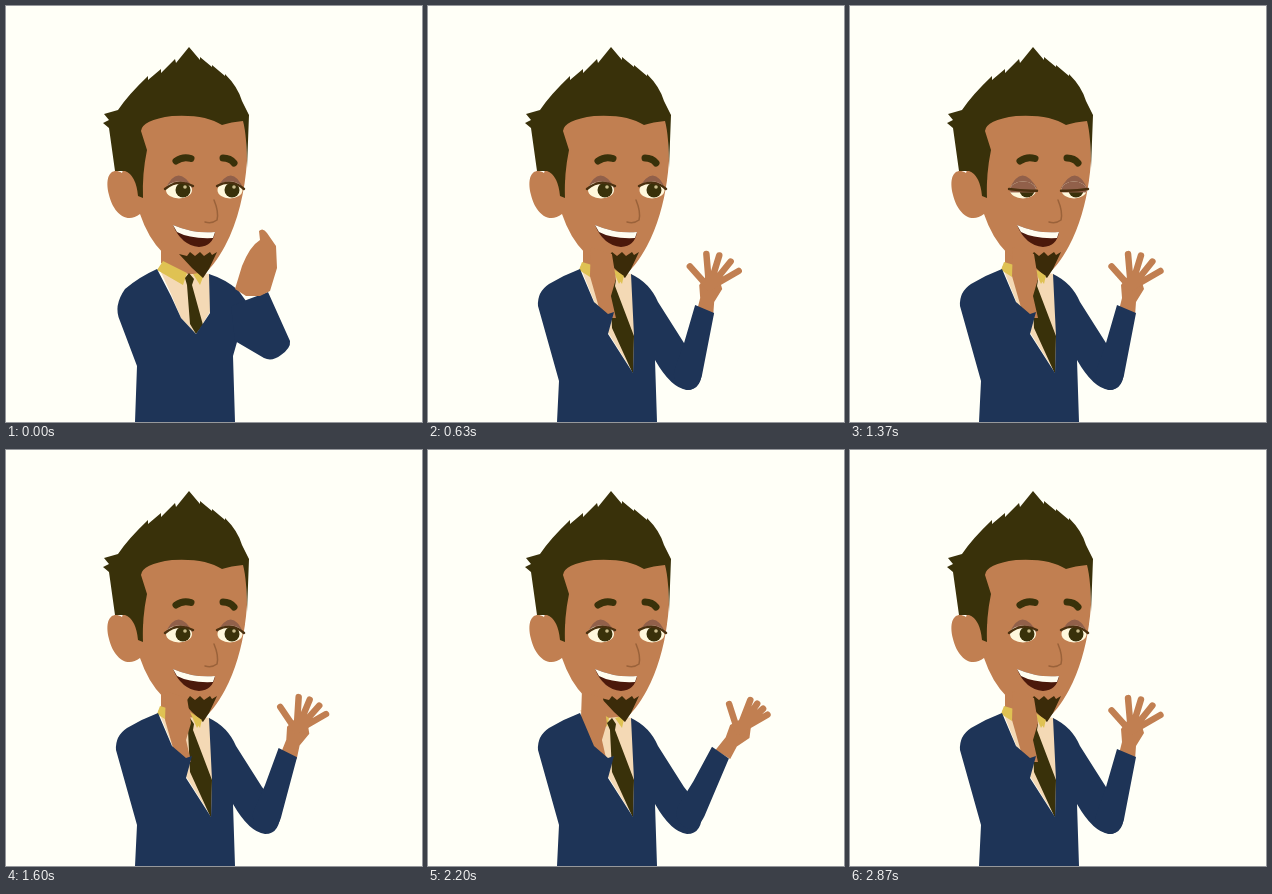
An HTML page that plays this animation: 416x416 px, repeating every 2.9 s.

```html
<!DOCTYPE html>
<html lang="en">
<head>
<meta charset="utf-8">
<title>Waving man</title>
<style>
html, body { margin: 0; width: 100%; height: 100%; overflow: hidden; background: #fffff7; }
svg { display: block; width: 100vw; height: 100vh; }
.skin { fill: #c17f51; }
.hair { fill: #39310a; }
.coat { fill: #1e3457; }
.shirt { fill: #f4d9b5; }
.collar { fill: #dfc253; }
.lid { fill: #91604a; }
.line { fill: none; stroke-linecap: round; stroke-linejoin: round; }
</style>
</head>
<body>
<svg viewBox="0 0 416 416">
  <defs>
    <clipPath id="eyeL"><ellipse cx="173" cy="184" rx="13" ry="8.5"/></clipPath>
    <clipPath id="eyeR"><ellipse cx="224" cy="184" rx="12.5" ry="8.5"/></clipPath>
  </defs>

  <!-- neck and shirt, arm folded in -->
  <g id="shirtIn">
    <path class="shirt" d="M153 262L204 268V306L190 328 175 312 165 288Z"/>
    <path class="skin" d="M155 242L202 255 198 268 182 268 155 257Z"/>
    <path class="collar" d="M157 255L181 267 177 279 151 264ZM187 268L199 266 194 279Z"/>
    <path class="hair" d="M179 272L183 267 188 273 186 279 197 319 190 328 184 318 181 279Z"/>
  </g>

  <!-- neck and shirt, arm out -->
  <g id="shirtOut">
    <path class="shirt" d="M152 260L204 268 207 330 206 368 176 320Z"/>
    <path class="skin" d="M155 242L202 255 198 266 180 268 155 257Z"/>
    <path class="collar" d="M171 262L181 268 179 277 172 268ZM187 268L197 265 194 278Z"/>
    <path class="hair" d="M179 273L184 268 188 274 187 280 206 330 205 368 184 322 182 280Z"/>
  </g>

  <!-- head -->
  <path class="skin" d="M134 208C120 219 107 206 103 189C98 169 106 161 116 167L133 112Q190 90 240 116L241 155C239 185 232 216 219 240Q207 262 197 268Q176 265 157 247Q142 232 134 208Z"/>
  <path class="hair" d="M109 165L103 122 97 117 103 114 98 108 112 104Q122 89 142 70L142 74 155 63 155 67 169 53 170 57 183 41 194 54 194 51 206 61 206 59 219 70 219 68Q232 81 236 95L243 109 241 162Q241 130 237 115Q225 116 216 119Q199 108 166 110Q136 114 135 125L141 144Q136 168 137 192L132 190Q130 169 119 165Z"/>
  <path class="line" stroke="#39310a" stroke-width="7" d="M170 155Q177 150 185 152.5M217 152Q224 152 228 157"/>

  <g id="eyes">
    <path class="lid" d="M159 184Q171 156 187 182ZM211 182Q226 156 238 184Z"/>
    <g clip-path="url(#eyeL)">
      <path fill="#fff8dc" d="M155 170h35v26h-35z"/>
      <circle class="hair" cx="177" cy="184" r="7.5"/>
      <circle cx="179" cy="181" r="1.8" fill="#c9bb8b"/>
      <rect class="lid cover" x="155" y="165" width="35" height="12"/>
    </g>
    <g clip-path="url(#eyeR)">
      <path fill="#fff8dc" d="M207 170h35v26h-35z"/>
      <circle class="hair" cx="226" cy="184" r="7.5"/>
      <circle cx="228" cy="181" r="1.8" fill="#c9bb8b"/>
      <rect class="lid cover" x="207" y="165" width="35" height="12"/>
    </g>
    <path id="lashes" class="line" stroke="#4a300f" stroke-width="2.4"/>
  </g>

  <path class="line" stroke="#9a623a" stroke-width="1.5" d="M208 194Q213 206 211 214Q206 218 199 216"/>
  <path fill="#4b190b" d="M167 219Q188 228 209 226Q207 240 193 241Q175 239 167 219Z"/>
  <path fill="#fffdf0" d="M167 219Q188 228 209 226L207 232Q184 233 171 226Z"/>
  <path fill="#3b2b09" d="M173 248L181 250 184 246 189 250 194 246 198 250 204 246 206 249 211 246 203 263 197 272 186 262Z"/>

  <!-- arm folded in -->
  <g id="bodyIn">
    <path class="coat" d="M151 263L165 290 175 312 190 328 204 307 203 268Q219 273 232 284L240 295 231 336 227 350 229 416H129L131 360 114 315Q107 300 119 283Q133 271 151 263Z"/>
    <g id="armIn">
      <path class="coat" d="M225 300L243 293 262 286 284 335Q285 342 275 349Q266 356 258 352L229 335Z"/>
      <path id="palm" class="skin"/>
    </g>
  </g>

  <!-- arm out -->
  <g id="bodyOut">
    <path id="tips" class="collar" d="M154 256L164 259 162 271 151 264ZM184 262L196 270 191 278Z"/>
    <path id="neck" class="skin" d="M163 241L184 248 188 273 183 290 188 312 174 312 162 270Z"/>
    <path class="coat" d="M152 263L166 296 180 308 186 306 180 328 205 367 206 330 203 268Q222 277 230 296L256 337 274 360Q275 384 259 384Q243 382 227 354L229 416H129L131 375 110 300Q109 286 121 278Q136 269 152 263Z"/>
    <g id="armOut">
      <g id="hand">
        <path class="skin" d="M268 308L272 292 271 279 278 270 291 273 294 283 286 296 285 310Z"/>
        <path id="fingers" class="line" stroke="#c17f51" stroke-width="6.5"/>
      </g>
      <path class="coat" d="M267 299L286 307 275 364Q272 384 259 384Q245 380 246 365L256 337Z"/>
    </g>
  </g>
</svg>
<script>
const LOOP = 2900, WAVE = 750, START = 70;
const $ = id => document.getElementById(id);
const show = (id, on) => $(id).style.display = on ? '' : 'none';
const move = (id, value) => $(id).setAttribute('transform', value);

const closedPalm = 'M229 283L236 260Q244 240 254 234L253 225Q257 221 261 227L270 240 271 262 264 285 254 290 240 290Z';
const fingerPalm = 'M229 283L236 262Q241 241 250 236L249 224Q252 221 257 230L258 225 262 229 268 229 267 235 271 238 270 262 264 283 254 289 240 290Z';

function finger(degrees, length) {
  const a = degrees * Math.PI / 180;
  return `M281 282L${281 + length * Math.sin(a)} ${282 - length * Math.cos(a)}`;
}

function blink(t) {
  const lid = Math.max(0, 1 - Math.abs(t - 1410) / 105);
  const drop = 15 * lid;
  document.querySelectorAll('.cover').forEach(e => e.setAttribute('height', 12 + drop));
  const y = 180 + drop * .5;
  const bend = 172 + drop * 1.4;
  $('lashes').setAttribute('d', `M159 183Q172 ${bend} 187 ${y}M211 ${y}Q226 ${bend} 238 183`);
}

function draw(t) {
  const first = t < START;
  const swing = first ? 0 : (1 + Math.cos(2 * Math.PI * t / WAVE)) / 2;
  const out = swing > .4;
  for (const part of ['shirt', 'body']) {
    show(part + 'In', !out);
    show(part + 'Out', out);
  }
  show('tips', out && swing < .85);

  $('palm').setAttribute('d', first ? closedPalm : fingerPalm);
  move('armIn', `rotate(${Math.max(0, swing - .06) * 25} 262 342)`);

  // zero while the open hand is upright, one when it leans outward
  const lean = swing > .77 ? (swing - .77) / .187 : Math.min(0, (swing - .72) / .25);
  const tilt = Math.max(0, lean);
  move('armOut', `translate(${4 * lean} ${-6 * tilt}) rotate(${12 * lean} 256 362)`);
  move('hand', `translate(${5 * tilt} ${-4 * tilt}) rotate(${12 * lean} 278 298)`);
  move('neck', `translate(${-9 * tilt} 0)`);

  const fan = 1 - .4 * tilt;
  $('fingers').setAttribute('d',
    finger(-42, 29) + [-5, 17, 39, 60].map(a => finger(a * fan, 34)).join(''));
  blink(t);
}

const begin = performance.now();
function tick() {
  draw((performance.now() - begin) % LOOP);
  requestAnimationFrame(tick);
}
tick();
</script>
</body>
</html>
```
